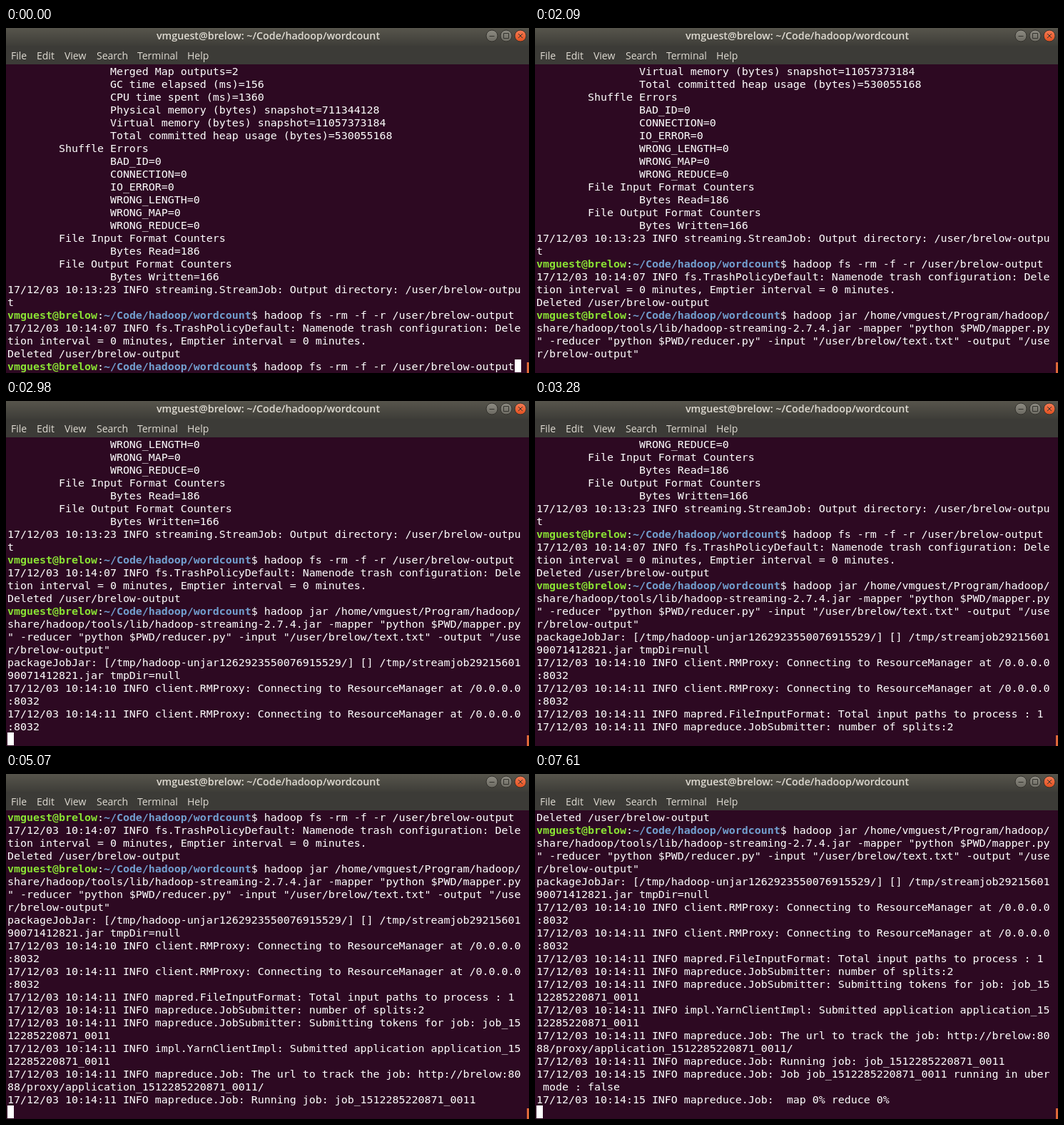
Write an HTML page that moves like this. It is 733 by 484 pixels and loops after 8000 ms.

```html
<!DOCTYPE html>
<html lang="en">
<head>
<meta charset="utf-8">
<title>Terminal</title>
<style>
  html, body { margin: 0; width: 100%; height: 100%; overflow: hidden; background: #2d0922; }
  body { position: relative; }
  #bar { position: absolute; left: 0; top: 0; }
  #bar text { font-family: "Open Sans", "Noto Sans", sans-serif; fill: #dfdbd2; }
  #screen {
    position: absolute; left: 2px; top: 52px; margin: 0;
    font: 14.95px/18px "DejaVu Sans Mono", monospace;
    color: #fff; white-space: pre; font-variant-ligatures: none;
  }
  #screen div { height: 18px; }
  b.who { color: #8ae234; }
  b.dir { color: #729fcf; }
  #cursor { position: absolute; width: 9px; height: 18px; background: #fff; }
  #thumb { position: absolute; left: 730px; top: 469px; width: 3px; height: 15px; background: #df6a3a; }
</style>
</head>
<body>
<svg id="bar" width="733" height="51" viewBox="0 0 733 51">
  <defs>
    <linearGradient id="titleBg" x2="0" y2="1">
      <stop offset="0" stop-color="#57554c"/>
      <stop offset="1" stop-color="#3e3d38"/>
    </linearGradient>
    <linearGradient id="grey" x2="0" y2="1">
      <stop offset="0" stop-color="#8d8b82"/>
      <stop offset="1" stop-color="#6c6a62"/>
    </linearGradient>
    <linearGradient id="red" x2="0" y2="1">
      <stop offset="0" stop-color="#f47b54"/>
      <stop offset="1" stop-color="#e2501f"/>
    </linearGradient>
  </defs>
  <rect width="733" height="51" fill="#3c3b37"/>
  <rect width="733" height="25" fill="url(#titleBg)"/>
  <text id="title" x="367.5" y="16" font-size="14.25" font-weight="600" text-anchor="middle"></text>
  <g stroke="#33322d">
    <circle cx="681" cy="11" r="8" fill="url(#grey)"/>
    <circle cx="701" cy="11" r="8" fill="url(#grey)"/>
    <circle cx="721" cy="11" r="8" fill="url(#red)"/>
    <path d="M677.5 11.5h7M697.5 7.5h7v7h-7zM718 8l6 6M724 8l-6 6" fill="none"/>
  </g>
  <g id="menu" font-size="14"></g>
</svg>
<div id="screen"></div>
<div id="cursor"></div>
<div id="thumb"></div>
<script>
const COLS = 80, ROWS = 24, CELL_W = 9, CELL_H = 18, LOOP = 8000;
const USER = "vmguest", HOST = "brelow";
const WHO = `${USER}@${HOST}`, DIR = "~/Code/hadoop/wordcount";
const PROMPT = `${WHO}:${DIR}$ `;
const OUT = `/user/${HOST}-output`;
const REMOVE = `${PROMPT}hadoop fs -rm -f -r ${OUT}`;
const JOB = "1512285220871_0011";

const counter = s => " ".repeat(16) + s;
const group = s => " ".repeat(8) + s;
const info = (time, s) => `17/12/03 10:${time} INFO ${s}`;

const log = [
  ...["Merged Map outputs=2", "GC time elapsed (ms)=156", "CPU time spent (ms)=1360",
    "Physical memory (bytes) snapshot=711344128",
    "Virtual memory (bytes) snapshot=11057373184",
    "Total committed heap usage (bytes)=530055168"].map(counter),
  group("Shuffle Errors"),
  ...["BAD_ID", "CONNECTION", "IO_ERROR", "WRONG_LENGTH", "WRONG_MAP", "WRONG_REDUCE"]
    .map(s => counter(s + "=0")),
  group("File Input Format Counters"),
  counter("Bytes Read=186"),
  group("File Output Format Counters"),
  counter("Bytes Written=166"),
  info("13:23", `streaming.StreamJob: Output directory: ${OUT}`),
  REMOVE,
  info("14:07", "fs.TrashPolicyDefault: Namenode trash configuration: " +
    "Deletion interval = 0 minutes, Emptier interval = 0 minutes."),
  `Deleted ${OUT}`,
  `${PROMPT}hadoop jar /home/${USER}/Program/hadoop/share/hadoop/tools/lib/` +
    `hadoop-streaming-2.7.4.jar -mapper "python $PWD/mapper.py" ` +
    `-reducer "python $PWD/reducer.py" -input "/user/${HOST}/text.txt" -output "${OUT}"`,
  "packageJobJar: [/tmp/hadoop-unjar1262923550076915529/] [] " +
    "/tmp/streamjob2921560190071412821.jar tmpDir=null",
  info("14:10", "client.RMProxy: Connecting to ResourceManager at /0.0.0.0:8032"),
  info("14:11", "client.RMProxy: Connecting to ResourceManager at /0.0.0.0:8032"),
  info("14:11", "mapred.FileInputFormat: Total input paths to process : 1"),
  info("14:11", "mapreduce.JobSubmitter: number of splits:2"),
  info("14:11", `mapreduce.JobSubmitter: Submitting tokens for job: job_${JOB}`),
  info("14:11", `impl.YarnClientImpl: Submitted application application_${JOB}`),
  info("14:11", `mapreduce.Job: The url to track the job: http://${HOST}:8088/proxy/application_${JOB}/`),
  info("14:11", `mapreduce.Job: Running job: job_${JOB}`),
  info("14:15", `mapreduce.Job: Job job_${JOB} running in uber mode : false`),
  info("14:15", "mapreduce.Job:  map 0% reduce 0%"),
];

const wrap = s => s.match(new RegExp(`.{1,${COLS}}`, "g"));
const lines = log.flatMap(wrap);

// [start ms, first visible line]
const scroll = [[0, 0], [150, 3], [1490, 4], [2690, 6], [2840, 8], [2980, 10],
  [3280, 12], [3430, 14], [3570, 19], [7610, 22]];
// [start ms, cursor shown]
const blink = [[0, 1], [750, 0], [1340, 1], [2090, 0], [2690, 1], [3280, 0], [3870, 1],
  [4470, 0], [5070, 1], [5670, 0], [6260, 1], [6860, 0], [7460, 1]];

const $ = id => document.getElementById(id);
const at = (steps, t) => steps.findLast(s => s[0] <= t)[1];

$("title").textContent = `${WHO}: ${DIR}`;
$("menu").innerHTML = [["File", 7], ["Edit", 43], ["View", 82], ["Search", 127],
  ["Terminal", 184], ["Help", 254]]
  .map(([name, x]) => `<text x="${x}" y="44">${name}</text>`).join("");

const paint = s => `<div>${s.replace(PROMPT,
  () => `<b class="who">${WHO}</b>:<b class="dir">${DIR}</b>$ `)}</div>`;

function visible(first) {
  if (first === 0) return [...lines.slice(0, ROWS - 1), REMOVE];
  if (first === 3) return lines.slice(first, first + ROWS);
  return lines.slice(first, first + ROWS - 1);
}

let shown = -1;
function draw(t) {
  const first = at(scroll, t);
  if (first !== shown) {
    shown = first;
    const rows = visible(first);
    const col = rows.length === ROWS ? rows[ROWS - 1].length : 0;
    $("screen").innerHTML = rows.map(paint).join("");
    $("cursor").style.left = 2 + col * CELL_W + "px";
    $("cursor").style.top = 51 + (ROWS - 1) * CELL_H + "px";
  }
  $("cursor").style.visibility = at(blink, t) ? "visible" : "hidden";
}

const start = performance.now();
function tick() {
  draw((performance.now() - start) % LOOP);
  requestAnimationFrame(tick);
}
tick();
</script>
</body>
</html>
```
